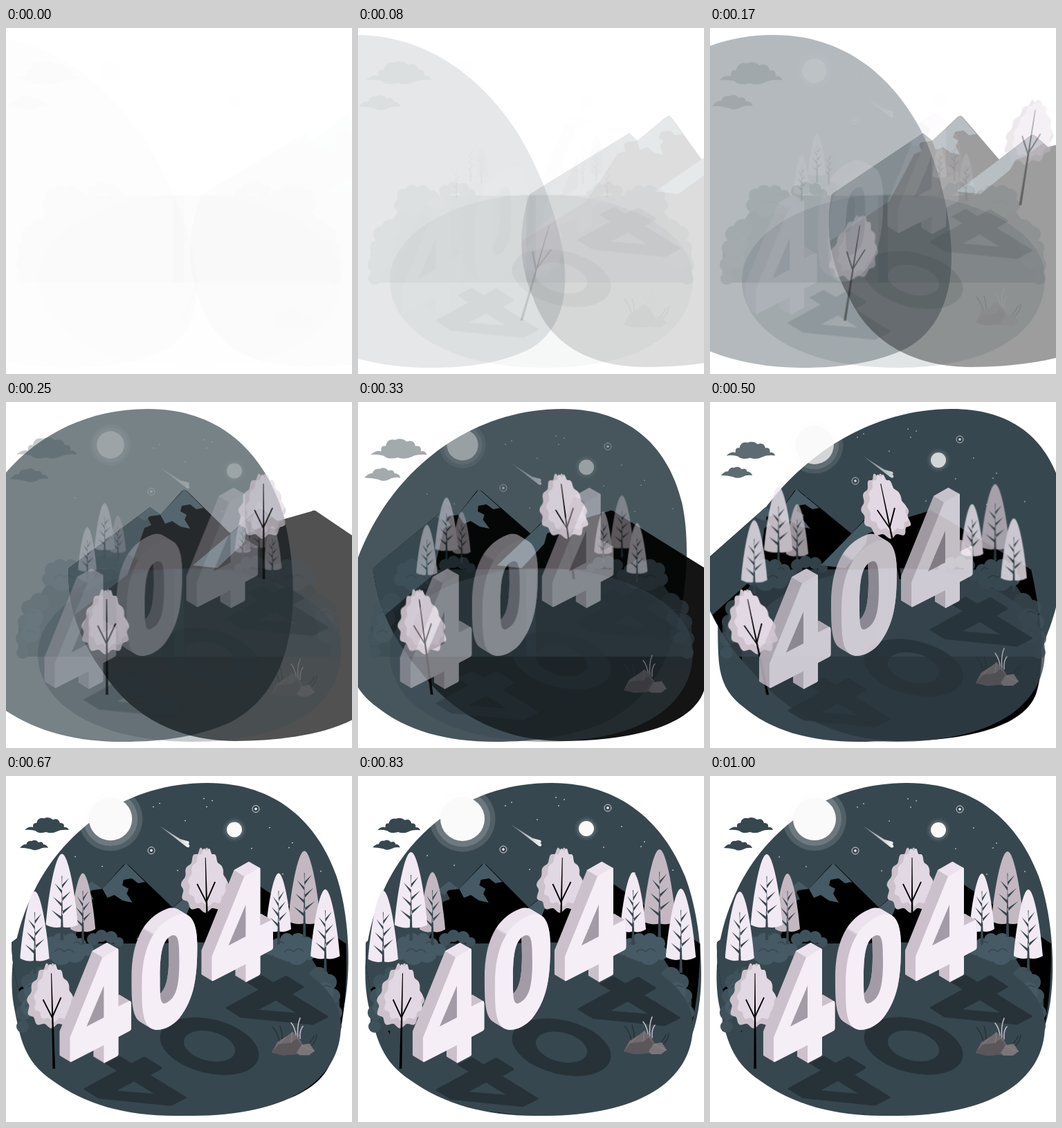
Recreate the animation shown at these times as an HTML page. Size 500x500 px, loop 1.04 s.

```html
<!DOCTYPE html>
<html lang="en">
<head>
<meta charset="utf-8">
<title>404 night scene</title>
<style>
html, body { margin: 0; width: 100%; height: 100%; overflow: hidden; background: #fff; }
svg { display: block; width: 100vw; height: 100vh; }
</style>
</head>
<body>
<svg viewBox="0 0 500 500">
  <defs>
    <clipPath id="landClip"><path d="M10 240C8 300 30 350 58 388C90 440 150 489 250 490C330 490 440 475 466 415C483 380 494 320 493 245V100H10Z"/></clipPath>
    <path id="four" fill-rule="evenodd" d="M139 262L160 250Q162 249 162 252V333L177 325.500Q180 324 180.500 328V365Q180.500 367 178 368.500L162 377V402Q162 404 160 405L141 415V389L94 413Q92 414 92 412V378ZM141 303V349L116 362Z"/>
    <clipPath id="fourHole"><path d="M141 303V349L116 362Z"/></clipPath>
    <path id="zero" fill-rule="evenodd" d="M247 201C267 194 276 212 276 245C276 290 272 322 250 350C235 367 211 374 202 357C196 345 196 325 196 300C196 250 212 214 247 201ZM238 231C226 237 222 256 222 290C222 318 222 332 231 328C246 321 250 302 250 268C250 240 249 226 238 231Z"/>
    <clipPath id="zeroHole"><path d="M238 231C226 237 222 256 222 290C222 318 222 332 231 328C246 321 250 302 250 268C250 240 249 226 238 231Z"/></clipPath>
    <linearGradient id="zeroSide" gradientUnits="userSpaceOnUse" x1="208" y1="190" x2="222" y2="250">
      <stop offset=".62" stop-color="#ebe2ed"/><stop offset=".66" stop-color="#cbc0cb"/>
    </linearGradient>
    <linearGradient id="trail"><stop stop-color="#fafafa" stop-opacity=".3"/><stop offset="1" stop-color="#fafafa"/></linearGradient>
    <g id="bushHalf">
      <path fill="#37474f" d="M18 368V325L60 262L130 242H257V368Z"/>
      <g id="bushBack" fill="#3f525b"></g>
      <g id="bushFront" fill="#455a64"></g>
      <path fill="none" stroke="#37474f" stroke-width="1.500" d="M70 254q8-8 14 0q8-7 14 1M98 242q6-6 10 2M30 306q7-7 13 0M28 334q8-8 14 0"/>
    </g>
    <g id="roundTree"></g>
  </defs>

  <path id="sky" fill="#37474f" d="M285 10C385 10 446 68 475 145C493 195 500 270 492 325C482 395 450 440 405 463C360 483 310 491 250 491C180 491 120 475 72 440C30 412 24 380 13 330C5 285 10 225 39 165C82 75 170 10 285 10Z"/>

  <g id="stars" fill="#fafafa">
    <path fill="url(#trail)" d="M221 72L265 100Q266 105 261 103ZM246 90L264 95Q266 99 262 99Z"/>
    <circle cx="330" cy="78" r="17" opacity=".05"/><circle cx="330" cy="78" r="14" opacity=".1"/><circle cx="330" cy="78" r="11"/>
    <g fill="none" stroke="#fafafa" stroke-width=".8"><circle cx="361" cy="48" r="5"/><circle cx="210" cy="108" r="5"/></g>
    <circle cx="361" cy="48" r="1.800"/><circle cx="210" cy="108" r="1.800"/>
  </g>

  <g id="moon" fill="#fafafa">
    <circle cx="151" cy="62" r="46" opacity=".13"/><circle cx="151" cy="62" r="39" opacity=".17"/><circle cx="151" cy="62" r="31"/>
  </g>

  <g id="clouds" fill="#37474f">
    <path d="M27 78Q33 72 39 74Q38 67 44 68Q46 59 55 61Q62 58 68 63Q76 60 78 68Q85 67 84 74Q89 73 91 78Q80 77 74 80Q66 84 58 81Q47 84 42 79Q34 77 27 78Z"/>
    <path d="M20 104Q25 98 29 99Q31 93 37 94Q43 91 47 96Q53 94 54 99Q59 99 61 104Q53 103 48 106Q41 109 36 106Q28 104 20 104Z"/>
  </g>

  <g id="mountains"><g clip-path="url(#landClip)">
    <path d="M5 244L128 152L143 163L174 129Q178 125 182 129L244 190L283 156Q287 153 291 156L312 172L361 158Q366 155 370 159L500 247V500H0Z"/>
    <path fill="#37474f" d="M5 244L128 152L143 163L124 166L130 178L120 182L112 205L95 250L5 318Z"/>
    <path fill="#455a64" d="M128 152L110 166L122 172L128 164L143 163ZM178 126L143 163L150 176L160 172L172 180L186 183L178 170L181 163L172 158L174 150L186 148L195 155L205 153L214 162ZM287 154L190 236L225 240L262 205L268 190L280 186L304 166Z"/>
  </g></g>

  <g id="bushes"></g>

  <path id="ground" fill="#37474f" d="M46 365C46 435 130 491 270 491C400 491 484 444 484 360C484 295 386 240 265 240C145 240 46 295 46 365Z"/>

  <g id="shadows" fill="#263238">
    <use href="#four" transform="matrix(.666 -.737 -.63 -.39 311 681)"/>
    <use href="#four" transform="matrix(.666 -.737 -.63 -.39 516 564)"/>
    <path fill-rule="evenodd" transform="translate(294 390) rotate(14)" d="M-73 0A73 39 0 0 1 73 0A73 39 0 0 1 -73 0ZM-38 0A38 21 0 0 0 38 0A38 21 0 0 0 -38 0Z"/>
  </g>

  <g id="conifers"></g>

  <g id="roundTrees">
    <use href="#roundTree"/><use href="#roundTree" transform="translate(227 -167)"/>
  </g>

  <g id="digits"></g>

  <g id="rocks">
    <g fill="none" stroke-linecap="round" stroke-width="1.500">
      <path stroke="#263238" d="M395 384Q393 372 385 363M399 380Q399 370 396 362M441 390Q448 384 449 374M437 388Q444 380 445 376"/>
      <path stroke="#cbc0cb" d="M420 380Q418 364 412 357M422 380Q420 362 425 350M425 380Q424 368 429 362"/>
    </g>
    <path fill="#6f6a6e" d="M384 400L392 385L405 377L414 370L423 379L432 394L428 402L400 404Z"/>
    <path fill="#5b565a" d="M384 400L394 388L412 386L420 380L432 394L428 402L400 404Z"/>
    <path fill="#7b757a" d="M420 400L427 389L439 387L446 398L438 404L424 404Z"/>
    <path fill="none" stroke="#8d878c" stroke-width=".8" d="M394 388L405 377M412 386L414 370M427 389L436 394L446 398"/>
  </g>
</svg>
<script>
const $ = id => document.getElementById(id);
const add = (id, markup) => $(id).insertAdjacentHTML('beforeend', markup);
const circle = ([x, y, r]) => `<circle cx="${x}" cy="${y}" r="${r}"/>`;

add('stars', [[286, 33], [298, 36], [222, 40], [213, 45], [290, 45], [259, 65], [381, 75], [409, 104], [414, 97],
  [455, 138], [100, 117], [139, 131], [248, 137], [400, 142], [355, 105], [312, 137]]
  .map(([x, y]) => circle([x, y, .8])).join(''));

add('bushBack', [[24, 362, 9], [25, 342, 11], [28, 318, 11], [34, 298, 12], [48, 290, 14],
  [126, 236, 9], [138, 231, 9], [152, 233, 9], [163, 240, 7]].map(circle).join(''));
add('bushFront', [[66, 242, 10], [78, 238, 11], [94, 237, 10], [107, 243, 9], [118, 251, 9], [62, 256, 10],
  [80, 256, 17], [100, 256, 14], [40, 312, 14], [36, 334, 14]].map(circle).join(''));
add('bushes', `<use class="half" href="#bushHalf"/><use class="half" href="#bushHalf" transform="matrix(-1 0 0 1 500 0)"/>`);

// Narrow tree: tapered crown, trunk and wedge-shaped cuts rising outwards
function conifer(x, top, w, h, color) {
  const cuts = [.42, .6, .78].map(k => {
    const reach = w * (.2 + k * .6), y = h * k;
    return `M0 ${y + 5}L${reach} ${y - 10}L0 ${y}ZM0 ${y + 13}L${-reach} ${y - 2}L0 ${y + 8}Z`;
  }).join('');
  return `<g transform="translate(${x} ${top})">
    <path fill="${color}" d="M0 0C${w * .4} 0 ${w * .85} ${h * .55} ${w} ${h - 4}Q${w * .5} ${h + 2} 0 ${h - 1}Q${-w * .5} ${h + 2} ${-w} ${h - 4}C${-w * .85} ${h * .55} ${-w * .4} 0 0 0Z"/>
    <path fill="#37474f" d="${cuts}M-.5 ${h * .3}L2.200 ${h + 18}H-2.200L.5 ${h * .3}Z"/></g>`;
}
const light = '#f1e9f3', shade = '#c3b8c2';
add('conifers', conifer(112, 141, 18, 84, shade) + conifer(82, 113, 23, 106, light) + conifer(43, 167, 21, 100, light) +
  conifer(430, 109, 23, 105, shade) + conifer(393, 141, 18, 84, light) + conifer(460, 164, 21, 100, light));

// Scalloped crown, wider towards the bottom
function crown(cx, cy, rx, ry) {
  const points = Array.from({ length: 120 }, (_, i) => {
    const a = i * Math.PI / 60, r = 1 + .06 * Math.sin(13 * a);
    const taper = .82 + .32 * Math.sin(a);
    return `${(cx + rx * r * taper * Math.cos(a)).toFixed(1)} ${(cy + ry * r * Math.sin(a)).toFixed(1)}`;
  });
  return `M${points.join('L')}Z`;
}
add('roundTree', `<path fill="#cdc2cc" d="${crown(63, 317, 38, 45)}"/><path fill="#e2d8e3" d="${crown(67, 313, 31, 40)}"/>
  <path d="M64.500 285H65.500L67 423H63.300Z"/><path fill="none" stroke="#000" stroke-width="1.800" d="M65 350L52 323M65 348L78 320"/>`);

// Solid figure: stacked copies for depth, darker inside the opening, then the face
function solid(shape, side, extra = '') {
  const layers = Array.from({ length: 16 }, (_, i) => `<use href="#${shape}" x="${i - 15}" y="${(i - 15) * .6}"/>`).join('');
  return `<g fill="${side}">${layers}</g><g fill="#a39ba6" clip-path="url(#${shape}Hole)">${layers}</g>
    ${extra}<use href="#${shape}" fill="#f5eef7"/>`;
}
const four = solid('four', '#cbc0cb', '<path fill="#ebe2ed" d="M139 262L124 253L145 241L162 250Z"/>');
add('digits', `<g transform="translate(205 -117)">${four}</g>${solid('zero', 'url(#zeroSide)')}${four}`);

// Cubic bezier (.36, -.01, .5, 1.38)
function ease(x) {
  if (x <= 0) return 0;
  if (x >= 1) return 1;
  const curve = (u, a, b) => 3 * (1 - u) * (1 - u) * u * a + 3 * (1 - u) * u * u * b + u * u * u;
  let lo = 0, hi = 1;
  for (let i = 0; i < 24; i++) {
    const mid = (lo + hi) / 2;
    if (curve(mid, .36, .5) < x) lo = mid; else hi = mid;
  }
  return curve(lo, -.01, 1.38);
}

const clamp = v => Math.max(0, Math.min(1, v));

function pose(id, transform, alpha) {
  $(id).setAttribute('transform', transform);
  $(id).setAttribute('opacity', clamp(alpha));
}

// Rush in from one side while leaning, swing past upright, settle
function rush(id, ms, side, cy) {
  let shift = 0, lean, alpha = 1;
  if (ms < 600) {
    alpha = ease(ms / 600);
    shift = 250 * (1 - alpha);
    lean = -.364 + .54 * alpha;
  } else if (ms < 800) lean = .176 - .211 * ease((ms - 600) / 200);
  else lean = -.035 * (1 - ease((ms - 800) / 200));
  pose(id, `matrix(1 0 ${side * lean} 1 ${side * (shift - lean * cy)} 0)`, alpha);
}

const slide = (id, p, dx, dy) => pose(id, `translate(${dx * (1 - p)} ${dy * (1 - p)})`, p);
const zoom = (id, p, from, cx, cy) =>
  pose(id, `translate(${cx} ${cy}) scale(${from + (1 - from) * p}) translate(${-cx} ${-cy})`, p);

const LOOP = 1040, STEP = 1000 / 24, LEAD = 30;

function draw(time) {
  const ms = Math.floor((time % LOOP + 5) / STEP) * STEP + LEAD;
  const p = ease(ms / 1000);
  rush('sky', ms, -1, 250);
  rush('mountains', ms, 1, 309);
  rush('roundTrees', ms, 1, 264);
  slide('stars', p, 0, 30);
  slide('rocks', p, 0, 30);
  slide('shadows', p, 0, -30);
  slide('digits', p, -30, 0);
  slide('ground', p, 0, 0);
  document.querySelectorAll('.half').forEach(half => half.setAttribute('opacity', clamp(p)));
  zoom('moon', p, .5, 151, 62);
  zoom('clouds', p, 1.5, 59, 84);
  zoom('conifers', p, .5, 251, 205);
}

const start = performance.now();
function tick() {
  draw(performance.now() - start);
  requestAnimationFrame(tick);
}
tick();
</script>
</body>
</html>
```
